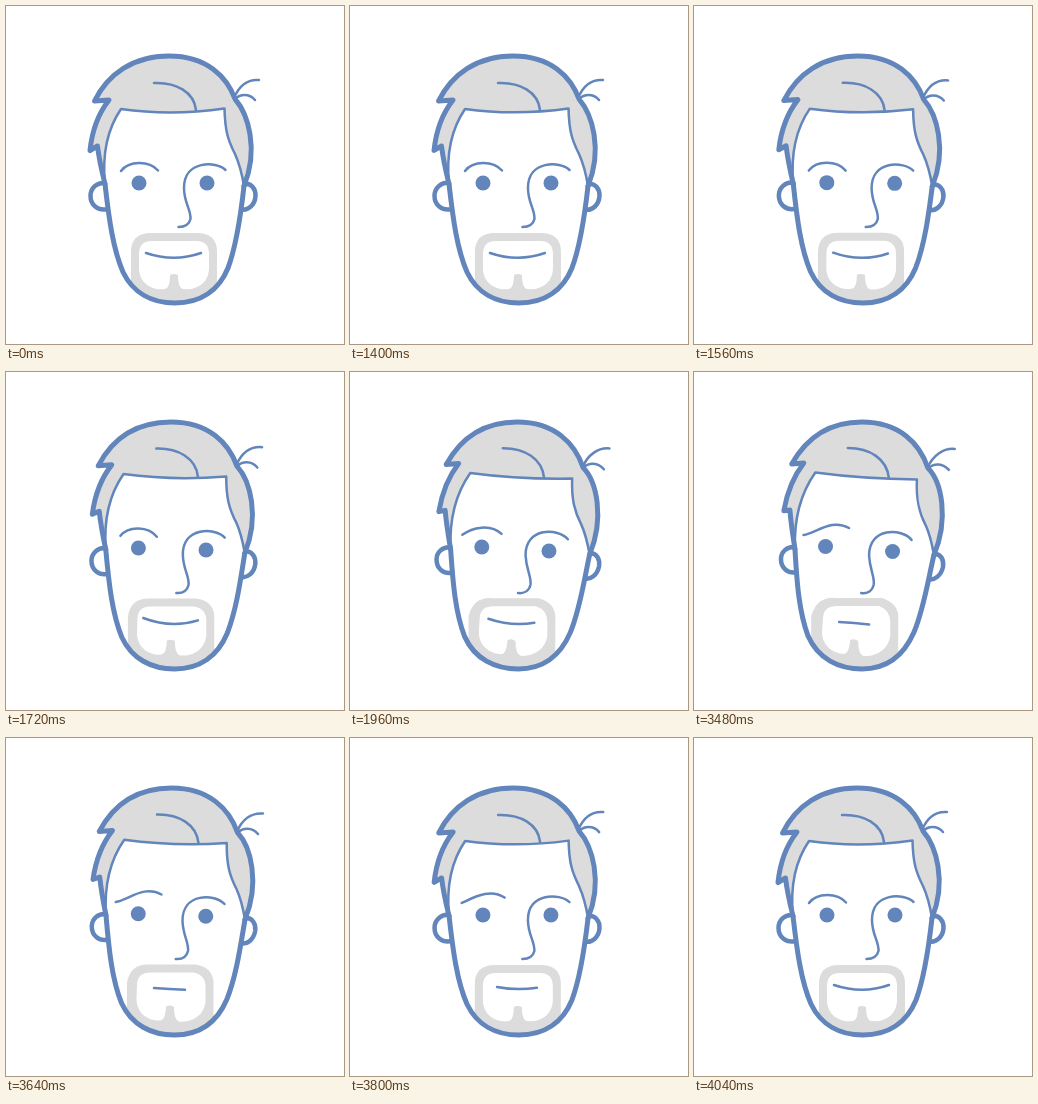
Animation of 338 by 338 pixels, one loop 5320 ms. Source, as an HTML page with a canvas:

```html
<!DOCTYPE html>
<html lang="en">
<head>
<meta charset="utf-8">
<title>Tilting head</title>
<style>
html, body { margin: 0; width: 100%; height: 100%; overflow: hidden; background: #fff; }
canvas { display: block; width: 100vw; height: 100vh; }
</style>
</head>
<body>
<canvas id="stage" width="338" height="338"></canvas>
<script>
const ctx = document.getElementById('stage').getContext('2d');
const BLUE = '#6285bb', GREY = '#dcdcdd', WHITE = '#fff';
const LOOP = 5320, STEP = 40;

// Each part: [upright, tilted], optionally followed by [worried upright, worried tilted].
const parts = {
  hair: [
    'M99 178 C96 166 93 153 91.5 140 L84 144.5 C86 125 92 108 103 94 L88.5 95 C102 68 127 50 163 50 C201 50 221 71 229 93 C242 108 253 143 238 180',
    'M101 177 C99 164 97 151 96 138 L90 138.5 C93 122 99 105 110 91 L98 92 C112 67 133 50 168 50 C206 50 226 72 234 96 C248 110 255 147 240 183'],
  hairline: [
    'M238 180 C236 168 234 159 229 148 C222 134 219 125 218.5 102.5 Q165 110 115 103 C102 122 96 148 99 178',
    'M240 183 C238 172 236 163 232 154 C225 141 222 128 223 107.5 Q170 107 121.5 100.5 C107 121 100 147 101 177'],
  face: [
    'M99 178 C103 213 107 243 117 266 C127 287 146 297 169 297 C195 297 213 284 222 262 C231 238 235 207 238 180',
    'M101 177 C103 212 105 240 114 264 C124 287 145 297 168 297 C193 297 210 283 220 260 C230 236 234 208 240 183'],
  leftEar: [
    'M99 177 C91 176 84.5 182 84.5 190 C84.5 199 92 205.5 102 203',
    'M101 175 C93 174 87 180 87 187 C87 196 94 202 103 200'],
  rightEar: [
    'M239 178 C245 177 250 183 249.5 190 C249 199 242 205 235 203.5',
    'M241 182 C247 182 250 188 249 195 C247 204 240 209 234 207'],
  beard: [
    'M125 290 V246 Q125 227 145 227 H191 Q211 227 211 246 V290 L190 300 H145 Z M133 248 Q133 235 146 235 H190 Q203 235 203 248 V262 C203 277 190 285 177 283 Q172 282 172 269 Q168 267 164 269 Q164 282 159 283 C146 285 133 277 133 262 Z',
    'M117 290 V244 Q123 224 142 226 H188 Q206 232 204 249 V290 L184 300 H139 Z M129 245 Q130 234 143 234 H185 Q197 239 196 252 V264 C194 278 181 285 169 284 Q164 282 164 269 Q160 266 156 268 Q155 281 150 282 C137 281 127 272 128 258 Z'],
  curl: ['M148 77 C170 76 188 86 190 104', 'M154 76 C176 76 193 87 195 106'],
  tuft: [
    'M228 92 C233 80 241 73 253 74 M229 93 C234 88 243 87 249 94',
    'M234 95 C239 84 249 76 261 77 M235 96 C240 91 249 91 255 98'],
  nose: [
    'M219.5 164 C210 155 178 154 178 182 C178 197 185 203 184.5 213 C183 219 178 221 172.5 221',
    'M217.5 168 C208 156 174.5 155 175 184 C176 199 181 205 179.5 213 C178 219 173 222 167 221'],
  brow: [
    'M115 165 C123 154.5 143 154.5 152 164.5', 'M113.5 162 C122 152 141 154 149 165',
    'M110 165 C123 163 138 147 156 157', 'M109.5 163 C122 161 138 146 155 156'],
  mouth: [
    'M140 247 Q168 256.5 195 247', 'M133 244.5 Q161 257 187 250.5',
    'M151 250 Q167 251 183 251', 'M145 250 Q160 251 175 252.5']
};

function mix(a, b, k) {
  const to = b.match(/[\d.]+/g);
  let i = 0;
  return a.replace(/[\d.]+/g, n => +n + (to[i++] - n) * k);
}

function ease(t, start, end) {
  const k = Math.min(1, Math.max(0, (t - start) / (end - start)));
  return (1 - Math.cos(Math.PI * k)) / 2;
}

function stroke(path, width) {
  ctx.lineWidth = width;
  ctx.stroke(new Path2D(path));
}

function fill(path, color, rule = 'nonzero') {
  ctx.fillStyle = color;
  ctx.fill(new Path2D(path), rule);
}

function eye(x, y) {
  ctx.beginPath();
  ctx.arc(x, y, 7.5, 0, 2 * Math.PI);
  ctx.fillStyle = BLUE;
  ctx.fill();
}

function draw(t) {
  const tilt = ease(t, 1360, 2200) - ease(t, 3440, 3840);
  const worry = ease(t, 1800, 2200) - ease(t, 3640, 4040);
  const p = {};
  for (const [name, [a, b, c, d]] of Object.entries(parts)) {
    p[name] = mix(a, b, tilt);
    if (c) p[name] = mix(p[name], mix(c, d, tilt), worry);
  }

  fill('M0 0H338V338H0Z', WHITE);
  ctx.strokeStyle = BLUE;
  ctx.lineCap = ctx.lineJoin = 'round';
  stroke(p.leftEar, 4.5);
  stroke(p.rightEar, 4.5);
  fill(p.face, WHITE);
  fill(p.hair + p.hairline.replace('M', 'L'), GREY);

  ctx.save();
  ctx.clip(new Path2D(p.face));
  fill(p.beard, GREY, 'evenodd');
  ctx.restore();

  for (const name of ['hairline', 'curl', 'tuft', 'nose', 'brow', 'mouth']) stroke(p[name], 2.5);
  stroke(p.hair, 5);
  stroke(p.face, 5);
  eye(133 - 1.5 * tilt, 177 - 2.5 * tilt);
  eye(201 - 2.5 * tilt, 177 + 2.5 * tilt);
}

function frame() {
  const t = performance.now() % LOOP;
  draw(Math.floor(t / STEP) * STEP);
  requestAnimationFrame(frame);
}
frame();
</script>
</body>
</html>
```
